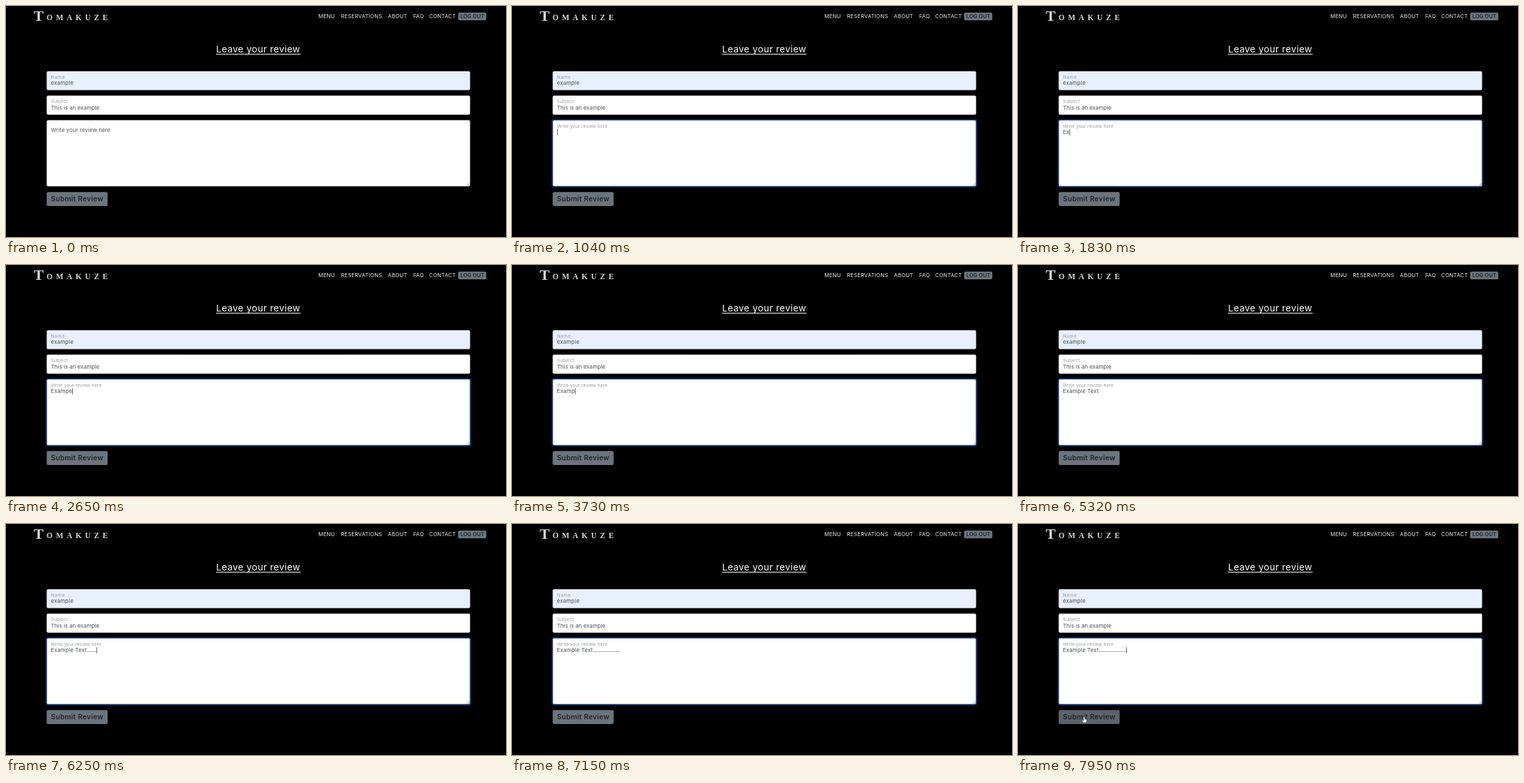
These frames come from a looping animation (740x343 px, 8000 ms). An HTML page:

```html
<!DOCTYPE html>
<html lang="en">
<head>
<meta charset="utf-8">
<title>Leave your review</title>
<style>
  html, body { margin: 0; width: 100%; height: 100%; overflow: hidden; background: #000; }
  svg { display: block; width: 740px; height: 343px; }
  text { font: 8px Inter, "Open Sans", sans-serif; letter-spacing: .1px; fill: #4a4e52; white-space: pre; }
  .logo { font: bold 11.5px "Liberation Serif", serif; letter-spacing: 5px; fill: #d8d8d8; }
  .logo.cap { font-size: 22px; letter-spacing: 0; }
  .nav text { font-size: 7.8px; letter-spacing: .27px; text-anchor: middle; fill: #eee; }
  .nav .out { font-weight: 600; letter-spacing: .1px; fill: #212529; }
  .title { font-size: 13.7px; letter-spacing: .4px; fill: #fff; }
  .label { font-size: 6.8px; letter-spacing: .1px; fill: #9a9da1; }
  .submit { font-size: 10.4px; font-weight: 600; letter-spacing: .28px; fill: #212529; }
  .field { fill: #fff; stroke: #ced4da; stroke-width: .5; }
  #entry { letter-spacing: .2px; }
  #dots { letter-spacing: -.55px; }

  .hint, .ring, .btn, .hand { animation: 8s linear infinite; }
  .hint { animation-name: float; letter-spacing: .13px; }
  .ring { animation-name: focus; }
  .btn { animation-name: hover; }
  .hand { animation-name: point; }
  @keyframes float {
    0%, 10% { transform: translate(66.5px, 186.5px); fill: #55595d; }
    11.25%, 100% { transform: translate(66.5px, 180.5px) scale(.85); fill: #9a9da1; }
  }
  @keyframes focus { 0%, 10% { opacity: 0; } 11.9%, 100% { opacity: 1; } }
  @keyframes hover { 0%, 96.5% { fill: #6c757d; } 98.4%, 100% { fill: #5c636a; } }
  @keyframes point {
    0%, 96.49% { transform: translate(110px, 278px); visibility: hidden; }
    96.5% { transform: translate(110px, 278px); visibility: visible; }
    99.3%, 100% { transform: translate(98px, 286.5px); visibility: visible; }
  }
</style>
</head>
<body>
<svg viewBox="0 0 740 343">
  <rect width="740" height="343"/>

  <text class="logo cap" x="41" y="22">T</text>
  <text class="logo" x="60" y="21.2">OMAKUZE</text>

  <g class="nav">
    <text x="474.6" y="18.2">MENU</text>
    <text x="526.2" y="18.2">RESERVATIONS</text>
    <text x="579.6" y="18.2">ABOUT</text>
    <text x="610.6" y="18.2">FAQ</text>
    <text x="646" y="18.2">CONTACT</text>
    <rect x="669.2" y="9.7" width="41.6" height="11.6" rx="2" fill="#6c757d"/>
    <text class="out" x="690.2" y="18.2">LOG OUT</text>
  </g>

  <text class="title" x="311" y="69.2">Leave your review</text>
  <rect x="311" y="71" width="125" height="1" fill="#fff"/>

  <rect class="field" x="60.4" y="97" width="626.3" height="27.8" rx="2" style="fill:#e8f0fe"/>
  <text class="label" x="66.5" y="107.6" style="letter-spacing:.45px">Name</text>
  <text x="66.5" y="117.3" style="letter-spacing:.25px">example</text>

  <rect class="field" x="60.4" y="133.2" width="626.3" height="28" rx="2"/>
  <text class="label" x="66.5" y="144">Subject</text>
  <text x="66.5" y="153.7">This is an example</text>

  <rect class="field" x="60.4" y="169.7" width="626.3" height="97.9" rx="2"/>
  <g class="ring" fill="none">
    <rect x="59.2" y="168.5" width="628.7" height="100.3" rx="3" stroke="#05204c" stroke-width="2"/>
    <rect x="60.2" y="169.5" width="626.7" height="98.3" rx="2" stroke="#4470b8" stroke-width=".6"/>
  </g>
  <path d="M682.5 266.5l3.5-3.5M684.6 266.5l1.4-1.4" stroke="#666" stroke-width=".6"/>
  <text class="hint">Write your review here</text>
  <text id="entry" x="66.5" y="190"><tspan id="words"></tspan><tspan id="dots"></tspan></text>
  <rect id="caret" y="183" width=".7" height="9" fill="#222"/>

  <rect class="btn" x="60.2" y="276.2" width="90.2" height="20.7" rx="2"/>
  <text class="submit" x="66.5" y="290.1">Submit Review</text>

  <path class="hand" fill="#fff" stroke="#222" stroke-width=".5" stroke-linejoin="round"
    d="M-1 0Q0-1 .9 0V3.2L3 3.6Q4 4 3.8 5.2L3.2 8.6H-1.2L-3.3 5.6Q-3.4 4.4-2.2 4.8L-1 5.8Z"/>
</svg>
<script>
  const LOOP = 8000, DOTS = 23;
  const $ = id => document.getElementById(id);
  const [entry, words, dots, caret] = ["entry", "words", "dots", "caret"].map($);

  // [time, text in the box]
  const typed = [
    [0, ""], [1620, "E"], [1730, "Ex"], [1930, "Exa"], [2230, "Exam"],
    [2440, "Examp"], [2650, "Exampe"], [2830, "Exampel"], [2950, "Exampel "],
    [3430, "Exampel"], [3640, "Exampe"], [3730, "Examp"], [3950, "Exampl"],
    [4020, "Example"], [4320, "Example "], [4420, "Example T"],
    [4520, "Example Te"], [4650, "Example Tex"], [4810, "Example Text"]
  ];
  // spans in which the caret is hidden
  const hidden = [[0, 800], [1300, 1620], [5320, 5540], [7150, 7310]];

  const clamp = v => Math.max(0, Math.min(1, v));

  function draw() {
    const t = performance.now() % LOOP;
    words.textContent = typed.filter(([at]) => at <= t).pop()[1];
    const n = t < 6030 ? 0 : 1 + Math.floor(clamp((t - 6030) / 670) * (DOTS - 1));
    dots.textContent = ".".repeat(n);
    caret.setAttribute("x", 66.8 + entry.getComputedTextLength());
    const off = hidden.some(([from, to]) => t >= from && t < to);
    caret.setAttribute("visibility", off ? "hidden" : "visible");
    requestAnimationFrame(draw);
  }
  draw();
</script>
</body>
</html>
```
